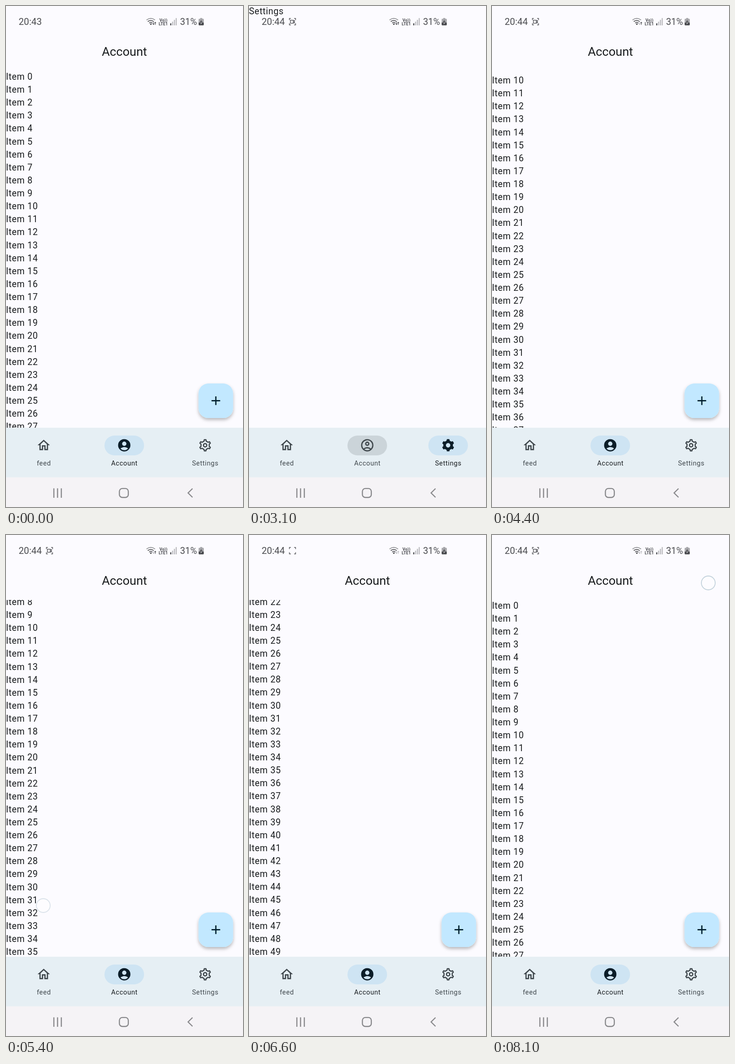
Recreate the animation shown at these times as an HTML page. Size 515 px wide and 1087 px high, loop 8.2 s.

```html
<!DOCTYPE html>
<html lang="en">
<head>
<meta charset="utf-8">
<title>Account list</title>
<style>
html, body { margin: 0; width: 100%; height: 100%; overflow: hidden; background: #fcfbff; }
svg { display: block; width: 515px; height: 1087px; font-family: Roboto, sans-serif; }
.body { font-size: 19.3px; letter-spacing: .604px; fill: #191c1e; }
.label { font-size: 14.48px; letter-spacing: .604px; text-anchor: middle; }
.line { fill: none; stroke: currentColor; }
.solid { fill: currentColor; }
</style>
</head>
<body>
<svg id="stage" viewBox="0 0 515 1087">
  <defs>
    <clipPath id="pane"><rect id="paneBox" width="515" height="915"/></clipPath>
    <clipPath id="listBox"><rect y="141" width="515" height="774"/></clipPath>
    <filter id="lift" x="-30%" y="-30%" width="160%" height="170%">
      <feDropShadow dx="0" dy="4" stdDeviation="3.6" flood-color="#000" flood-opacity=".27"/>
    </filter>
  </defs>
  <rect width="515" height="1087" fill="#fcfbff"/>

  <g id="app" clip-path="url(#pane)">
    <text id="settings" class="body" y="18">Settings</text>
    <g id="account">
      <rect width="515" height="915" fill="#fcfbff"/>
      <text x="257.4" y="108" font-size="26.55" text-anchor="middle" fill="#191c1e">Account</text>
      <g clip-path="url(#listBox)"><g id="list" class="body"></g></g>
      <rect x="418.4" y="819" width="75.1" height="75.1" rx="21.4" fill="#c2e8ff" filter="url(#lift)"/>
      <path d="M446.6 856.4h18.8M456 847v18.8" stroke="#001e2c" stroke-width="2.7"/>
    </g>
  </g>

  <g id="status" fill="#4b4c50">
    <text id="clock" x="27.5" y="41" font-size="20.2"></text>
    <g id="rec" class="line" color="#5c5d61" stroke-width="1.5">
      <path d="M91 27h-3.3v3.6M98 27h3.3v3.6M91 41h-3.3v-3.6M98 41h3.3v-3.6"/>
      <path id="cam" d="M90 30.7h6.2v6.8H90zM96.2 33.4l2.6-1.9v5.2l-2.6-1.9"/>
    </g>
    <g class="line" color="#4b4c50" stroke-width="1.7">
      <path d="M305.3 30.4q9.3-7 18.6 0" stroke="#8c8d91"/>
      <path d="M308 33.8q6.6-5 13 0M311 37q3.7-2.8 7.2 0"/>
    </g>
    <circle cx="314.8" cy="39.4" r="1.7"/>
    <path id="down" d="M320.4 34.5v5.6m-1.7-1.7l1.7 2l1.7-2" fill="none" stroke-width="1.1"/>
    <path id="up" d="M324.3 41v-5.6m-1.7 1.7l1.7-2l1.7 2" fill="none" stroke-width="1.1"/>
    <g font-size="9" font-weight="700">
      <text x="333.5" y="33.5">Vo))</text>
      <text x="331.8" y="42">LTE1</text>
    </g>
    <path d="M356.8 37.5h2.4V42h-2.4z"/>
    <path d="M360.8 34h2.4v8h-2.4zM364.8 30h2.4v12h-2.4zM368.7 26.3h2.4V42h-2.4z" fill="#bcbcc0"/>
    <text x="378.2" y="41" font-size="19.8">31%</text>
    <path d="M422 26h4.4v1.8h2q1.4 0 1.4 1.4V36h-11.2v-6.8q0-1.4 1.4-1.4h2z" fill="#a9a9ad"/>
    <path d="M418.6 36h11.2v4.6q0 1.4-1.4 1.4H420q-1.4 0-1.4-1.4zM425.2 29.5l-4.2 6h2.8l-.8 4.5l4.4-6.3h-2.9z"/>
  </g>

  <rect y="915" width="515" height="108" fill="#e6eff4"/>
  <g id="tabs"></g>

  <rect y="1022.5" width="515" height="65" fill="#f5f3f6"/>
  <g class="line" color="#89898c" stroke-width="2.4">
    <path d="M104 1046.5v20.5M112 1046.5v20.5M120.2 1046.5v20.5"/>
    <rect x="246.4" y="1046.9" width="19.4" height="19.4" rx="6.3"/>
    <path d="M405.3 1047l-9.6 9.5l9.6 9.5"/>
  </g>
  <circle id="touch" r="15" fill="#fff" fill-opacity=".35" stroke="#c3d2dc" stroke-width="1.8"/>
</svg>
<script>
const LOOP = 8200, STEP = 100, FULL = 515, SMALL = 75.3, PITCH = 28.12, END = 627;
const OPEN = 1400, BACK = 3200;
const $ = id => document.getElementById(id);
const set = (node, attrs) => { for (const k in attrs) node.setAttribute(k, attrs[k]); };
const clamp = v => Math.min(1, Math.max(0, v));
const span = (t, a, b) => clamp((t - a) / (b - a));
const mix = (a, b, u) => a + (b - a) * u;
const smooth = u => u * u * (3 - 2 * u);
const easeOut = u => 1 - (1 - u) ** 2;

// cubic-bezier(.4, 0, .2, 1)
function standard(x) {
  let lo = 0, hi = 1;
  for (let i = 0; i < 24; i++) {
    const s = (lo + hi) / 2, r = 1 - s;
    if (1.2 * r * r * s + .6 * r * s * s + s ** 3 < x) lo = s; else hi = s;
  }
  return 3 * (1 - lo) * lo * lo + lo ** 3;
}

// remaining distance of a critically damped spring
function spring(ms) {
  const x = Math.max(0, ms) * .02;
  return (1 + x) * Math.exp(-x);
}

function gear(tip, top, base, root) {
  const pts = [];
  for (let k = 0; k < 6; k++) {
    const c = Math.cos(k * Math.PI / 3), s = Math.sin(k * Math.PI / 3);
    for (const [x, y] of [[-base, -root], [-tip, -top], [tip, -top], [base, -root]])
      pts.push((12 + x * c - y * s).toFixed(2) + ' ' + (12 + x * s + y * c).toFixed(2));
  }
  return 'M' + pts.join('L') + 'Z';
}

const home = '<path class="solid" d="M12 5.69l5 4.5V18h-2v-6H9v6H7v-7.81l5-4.5M12 3L2 12h3v8h6v-6h2v6h6v-8h3z"/>';
const icons = {
  feed: [home, home],
  Account: [
    `<g class="line" stroke-width="2"><circle cx="12" cy="12" r="9"/><circle cx="12" cy="9.5" r="2.5"/>
     <path d="M6.3 18.1q5.7-4.2 11.4 0"/></g>`,
    `<path class="solid" fill-rule="evenodd" d="M12 2a10 10 0 1 0 0 20a10 10 0 0 0 0-20zM12 6a3.5 3.5 0 0 1 0 7a3.5 3.5 0 0 1 0-7z
     M12 20c-2 0-4.4-.8-6.1-2.9C7.5 15.8 9.7 15 12 15s4.5.8 6.1 2.1C16.4 19.2 14 20 12 20z"/>`],
  Settings: [
    `<g class="line" stroke-width="1.9" stroke-linejoin="round"><path d="${gear(1.35, 9, 1.75, 6.7)}"/>
     <circle cx="12" cy="12" r="2.7"/></g>`,
    `<path class="solid" stroke="currentColor" stroke-width=".8" stroke-linejoin="round" fill-rule="evenodd"
     d="${gear(1.7, 9.5, 2.2, 7.2)}M12 8a4 4 0 0 0 0 8a4 4 0 0 0 0-8z"/>`]
};

const tabs = [['feed', 82], ['Account', 257], ['Settings', 432.7]].map(([name, x]) => {
  const g = document.createElementNS('http://www.w3.org/2000/svg', 'g');
  g.innerHTML = `<clipPath id="pill${name}"><rect x="${x - 43}" y="932" width="86" height="43" rx="21.5"/></clipPath>
    <rect class="pill" y="932" height="43" rx="21.5" fill="#cee4f3"/>
    <circle class="ripple" cx="${x}" cy="953.5" fill="#40484c" clip-path="url(#pill${name})"/>
    <g transform="translate(${x - 16.1} 937) scale(1.34)"><g class="off">${icons[name][0]}</g><g class="on">${icons[name][1]}</g></g>
    <text class="label" x="${x + .3}" y="997.4">${name}</text>`;
  $('tabs').append(g);
  const part = c => g.querySelector('.' + c);
  return { name, x, pill: part('pill'), ripple: part('ripple'), off: part('off'), on: part('on'), label: part('label') };
});

for (let i = 0; i < 50; i++)
  $('list').insertAdjacentHTML('beforeend', `<text x="0" y="${(160 + i * PITCH).toFixed(2)}">Item ${i}</text>`);

function scrollAt(t) {
  if (t < 5000) return 395 * easeOut(span(t, 4000, 4900));
  if (t < 5400) return mix(395, 233, span(t, 5000, 5400));
  if (t < 6000) return 233 * (1 - easeOut(span(t, 5400, 5800)));
  if (t < 7300) return END * smooth(span(t, 6000, 6600));
  return END * (1 - smooth(span(t, 7300, 7900)));
}

function fingerAt(t, scroll) {
  const during = (a, b) => t >= a && t < b;
  if (during(1100, 1300)) return [436, 952];
  if (during(2700, 2900)) return [260, 952];
  if (during(4100, 4300)) return [81, 800 - scroll];
  if (during(5100, 5500)) return [81, 1037 - scroll];
  if (during(6100, 6300)) return [81, 790 - scroll];
  if (during(7400, 7600)) return [81, 1100 - scroll];
  if (t >= 8100) return [470, 104];
  return null;
}

function drawTabs(t) {
  const toSettings = span(t, OPEN, OPEN + 100) - span(t, BACK, BACK + 100);
  const press = {
    Settings: [span(t, 1000, 1300), 1 - span(t, OPEN, OPEN + 200)],
    Account: [span(t, 2600, 3000), 1 - span(t, BACK, BACK + 200)]
  };
  for (const tab of tabs) {
    const level = tab.name === 'Settings' ? toSettings : tab.name === 'Account' ? 1 - toSettings : 0;
    const on = level > .5, w = 86 * level;
    set(tab.pill, { x: tab.x - w / 2, width: w, opacity: level });
    tab.off.style.display = on ? 'none' : '';
    tab.on.style.display = on ? '' : 'none';
    set(tab.off.parentNode, { color: on ? '#0b1d28' : '#40484d' });
    set(tab.label, { fill: on ? '#171c1f' : '#40484d' });
    const [grow, fade] = press[tab.name] || [0, 0];
    set(tab.ripple, { r: 48 * standard(grow), opacity: .16 * fade });
  }
}

function draw(t) {
  const back = t >= BACK;
  const from = back ? BACK : OPEN;
  const left = spring(t - from);
  const width = back ? mix(FULL, SMALL, left) : mix(SMALL, FULL, left);
  const fade = standard(span(t, from, from + 700));
  const shown = back ? fade : 1 - fade;
  const scroll = scrollAt(t);

  set($('paneBox'), { width });
  set($('account'), { transform: `translate(${(width - FULL) / 2} 0)`, opacity: shown });
  set($('settings'), { x: (width - SMALL) / 2, opacity: 1 - shown });
  const top = $(back ? 'account' : 'settings');
  if ($('app').lastElementChild !== top) $('app').append(top);
  set($('list'), { transform: `translate(0 ${-scroll})` });

  $('clock').textContent = t < 2600 ? '20:43' : '20:44';
  $('rec').style.display = t < 100 ? 'none' : '';
  $('cam').style.display = (t + 900) % 1000 < 500 ? '' : 'none';
  set($('down'), { stroke: t < 3500 ? '#4b4c50' : '#bcbcc0' });
  set($('up'), { stroke: t < 6100 ? '#4b4c50' : '#bcbcc0' });
  drawTabs(t);

  const finger = fingerAt(t, scroll);
  $('touch').style.display = finger ? '' : 'none';
  if (finger) set($('touch'), { cx: finger[0], cy: finger[1], 'stroke-opacity': t >= 8100 ? 1 : .6 });
}

const start = performance.now();
function tick() {
  const t = (performance.now() - start) % LOOP;
  draw(Math.floor(t / STEP) * STEP);
  requestAnimationFrame(tick);
}
tick();
</script>
</body>
</html>
```
